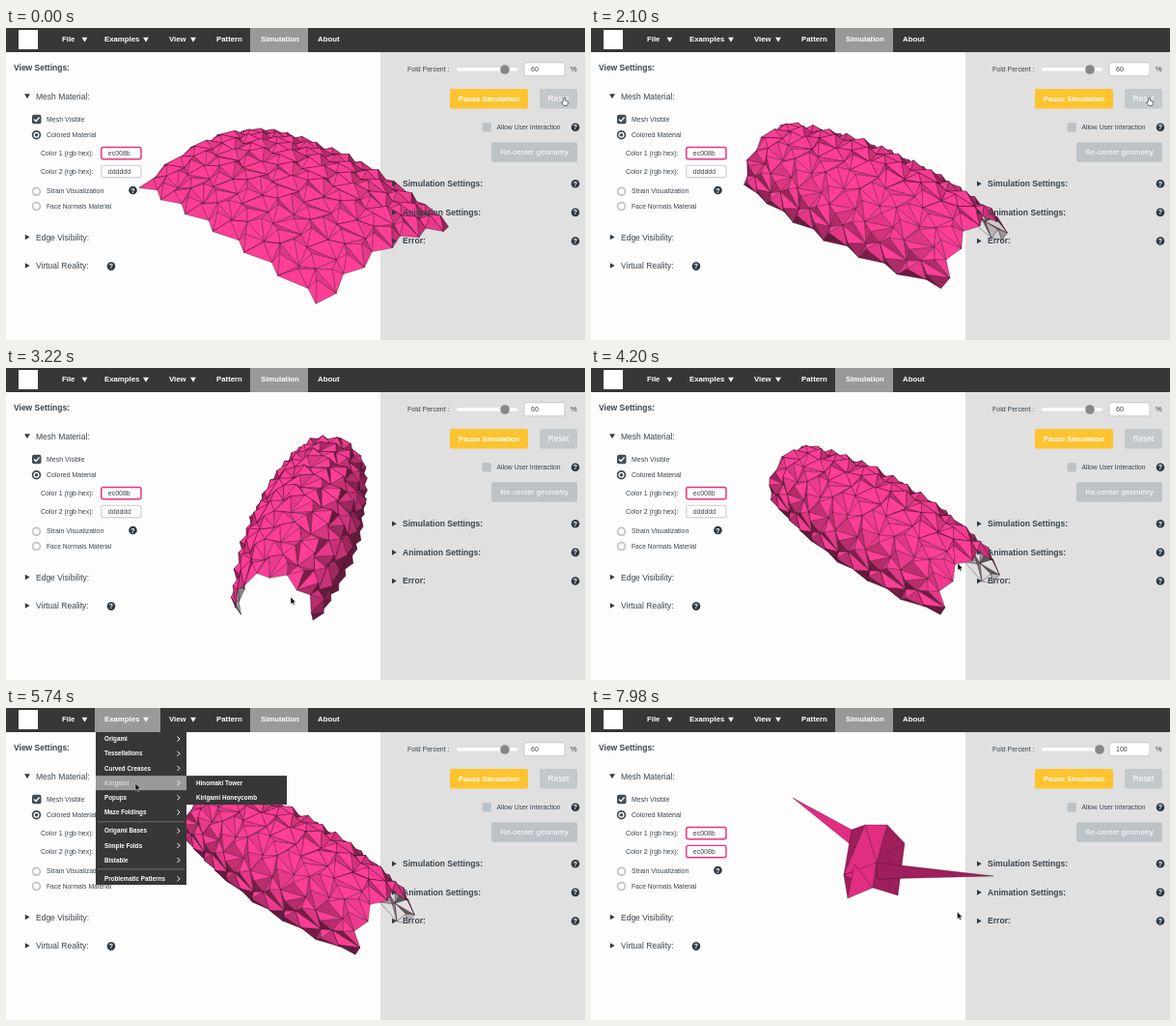
An HTML page with a canvas for the animation above (8 s loop, 600 px wide and 323 px high).

```html
<!DOCTYPE html>
<html>
<head>
<meta charset="utf-8">
<style>
  html, body { margin: 0; width: 600px; height: 323px; overflow: hidden; }
  body { background: linear-gradient(90deg, #fdfdfd 388px, #e0e0e0 388px); }
  canvas, svg { position: absolute; left: 0; top: 0; }
  text { font-family: "Liberation Sans", Arial, sans-serif; fill: #3a444d; white-space: pre; }
  .b { font-weight: bold; }
  .w { fill: #fff; }
</style>
</head>
<body>
<canvas id="stage" width="600" height="323"></canvas>
<svg id="ui" width="600" height="323"></svg>
<script>
const LOOP = 8000, STEP = 140, LOAD_TIME = 6300;
const ctx = document.getElementById('stage').getContext('2d');
const el = id => document.getElementById(id);
const clamp = (x, lo = 0, hi = 1) => Math.max(lo, Math.min(hi, x));
const smooth = x => x * x * (3 - 2 * x);
const mix = (a, b, f) => a.map((x, i) => x + (b[i] - x) * f);
const hash = (i, j) => {
  const x = Math.sin(i * 12.9898 + j * 78.233) * 43758.5453;
  return x - Math.floor(x);
};

// Follows moves of the form [start, end, ...values]; it rests between them.
const track = (moves, t) => moves.reduce(
  (now, [start, end, ...next]) => mix(now, next, smooth(clamp((t - start) / (end - start)))),
  moves[0].slice(2));

// ---------- interface ----------
const text = (x, y, s, size = 7, cls = '', extra = '') =>
  `<text x="${x}" y="${y}" font-size="${size}" class="${cls}" ${extra}>${s}</text>`;
const rect = (x, y, w, h, fill, r = 0, extra = '') =>
  `<rect x="${x}" y="${y}" width="${w}" height="${h}" rx="${r}" fill="${fill}" ${extra}/>`;
const path = (d, fill = '#2f3943', extra = '') => `<path d="${d}" fill="${fill}" ${extra}/>`;
const ring = (x, y, color) =>
  `<circle cx="${x}" cy="${y}" r="3.9" fill="#fff" stroke="${color}" stroke-width="1.7"/>`;
const help = (x, y) =>
  `<circle cx="${x}" cy="${y}" r="4.3" fill="#2f3943"/>` +
  text(x, y + 2.5, '?', 7, 'b w', 'text-anchor="middle"');
const right = (x, y) => path(`M${x} ${y - 2.8}l4.8 2.8-4.8 2.8z`);
const down = (x, y, fill) => path(`M${x - 2.9} ${y - 2.3}h5.8l-2.9 4.8z`, fill);
const field = (id, x, y, w, h, color, width, value) =>
  rect(x, y, w, h, '#fff', 2, `stroke="${color}" stroke-width="${width}" id="${id}Box"`) +
  text(x + 7, y + h / 2 + 2.6, value, 7, '', `id="${id}"`);
const button = (x, y, w, label, size, fill, cls = '') =>
  rect(x, y, w, 20.5, fill, 2) +
  text(x + w / 2, y + 13, label, size, 'w ' + cls, 'text-anchor="middle"');

const examples = ['Origami', 'Tessellations', 'Curved Creases', 'Kirigami', 'Popups', 'Maze Foldings',
  'Origami Bases', 'Simple Folds', 'Bistable', 'Problematic Patterns'];
const submenus = { 0: ['Crane', 'Flapping Bird'], 3: ['Hinomaki Tower', 'Kirigami Honeycomb'] };
const rowY = i => 32 + 15.2 * i + (i > 5) * 4 + (i > 8) * 4;

function menu(hover) {
  let s = rect(93, 25, 94, 158, '#373737');
  examples.forEach((name, i) => {
    const y = rowY(i);
    if (i === hover) s += rect(93, y - 7.5, 94, 15, '#999');
    s += text(102, y + 2.2, name, 6.3, 'b w', i === hover ? 'opacity=".6"' : '') +
      path(`M177.5 ${y - 2.5}l2.5 2.5-2.5 2.5`, 'none', 'stroke="#fff"');
  });
  s += rect(95, 117.5, 90, .7, '#888') + rect(95, 166.5, 90, .7, '#888');
  if (submenus[hover]) {
    const y = rowY(hover) - 7.5;
    s += rect(187, y, 104, 30, '#373737') +
      submenus[hover].map((name, i) => text(197, y + 10 + i * 15, name, 6.3, 'b w')).join('');
  }
  return s;
}

el('ui').innerHTML = [
  rect(0, 0, 600, 25, '#373737'),
  rect(253, 0, 60, 25, '#999'),
  rect(92, 0, 68, 25, '#999', 0, 'id="tab"'),
  rect(13, 2, 20, 20, '#fff'),
  ...[['File', 58], ['Examples', 102], ['View', 169], ['Pattern', 218], ['Simulation', 264], ['About', 323]]
    .map(([s, x]) => text(x, 14.2, s, 7.8, 'b w')),
  ...[81.5, 145, 194].map(x => down(x, 12, '#fff')),

  text(8, 44, 'View Settings:', 8.5, 'b'),
  down(22, 70.5), text(31, 73.5, 'Mesh Material:', 8.5),
  rect(27, 89.7, 9.5, 9.5, '#434c55', 2),
  path('M29 94.5l2 2 3.6-4', 'none', 'stroke="#fff" stroke-width="1.4"'),
  text(42, 97, 'Mesh Visible'),
  ring(31.5, 110.7, '#434c55'), '<circle cx="31.5" cy="110.7" r="1.8" fill="#434c55"/>',
  text(42, 112.8, 'Colored Material'),
  text(36, 131.7, 'Color 1 (rgb hex):'), field('c1', 98.8, 123.4, 41.2, 12.4, '#f0307f', 1.5, 'ec008b'),
  text(36, 150.7, 'Color 2 (rgb hex):'), field('c2', 98.8, 142.4, 41.2, 12.4, '#d4d6d8', 1.4, 'dddddd'),
  ring(31.5, 169.3, '#bfc3c6'), text(42, 171, 'Strain Visualization'), help(131.5, 168),
  ring(31.5, 184.6, '#bfc3c6'), text(42, 186.5, 'Face Normals Material', 6.7),
  right(19.8, 216.5), text(31, 219.8, 'Edge Visibility:', 8.5),
  right(19.8, 246), text(31, 249.4, 'Virtual Reality:', 8.5), help(109, 246.6),

  text(416, 45.3, 'Fold Percent :'),
  rect(467, 41.3, 63, 3.2, '#fff', 1.6), '<circle id="knob" cy="43" r="4.8" fill="#868686"/>',
  field('pct', 537, 35.8, 42, 14, '#c8c8c8', 1, '60'), text(585, 45.3, '%', 7.5),
  button(460, 63, 81, 'Pause Simulation', 7.6, '#fec32e', 'b'),
  button(553, 63, 39, 'Reset', 8.2, '#c3c8cb'),
  rect(493.5, 98, 9.5, 9.5, '#bdc2c6', 2), text(508.5, 105.3, 'Allow User Interaction', 6.8),
  help(590, 102.8),
  button(503, 118.3, 89, 'Re-center geometry', 8, '#bdc2c6'),
  ...['Simulation Settings:', 'Animation Settings:', 'Error:'].map((s, i) => {
    const y = 161.3 + i * 29.6;
    return right(400, y) + text(411, y + 2.9, s, 8.6, 'b') + help(590, y);
  }),
  '<g id="menu"></g>',
  path('M0 0v7.6l1.7-1.5 1.2 2.5 1.2-.5-1.1-2.5h2.4z', '#111', 'id="arrow" stroke="#fff" stroke-width=".4"'),
  path('M-1 0h1.3v3l3 .8v2.6l-1 2h-3.3l-2.4-3.2 1.4-.3z', '#fff', 'id="hand" stroke="#333" stroke-width=".7"')
].join('');

const cursorMoves = [
  [0, 1, 579, 72], [2240, 2520, 405, 215], [2520, 3220, 295, 237], [3360, 4200, 380, 202],
  [4620, 5000, 125, 14], [5000, 5740, 134, 78], [5740, 6300, 205, 35],
  [6300, 6720, 517, 42], [6720, 7200, 527, 42], [7200, 7980, 379.5, 211]
];

function updateUi(t, percent) {
  const [x, y] = track(cursorMoves, t), loaded = t >= LOAD_TIME, open = t >= 4900 && !loaded;
  const hover = x > 187 ? 0 : examples.findIndex((_, i) => Math.abs(rowY(i) - y) < 7.7);
  el('menu').innerHTML = open ? menu(hover) : '';
  el('tab').style.display = open ? '' : 'none';
  el('c2').textContent = loaded ? 'ec008b' : 'dddddd';
  el('c2Box').setAttribute('stroke', loaded ? '#f0307f' : '#d4d6d8');
  el('pct').textContent = percent;
  el('knob').setAttribute('cx', 502 + percent / 4);
  for (const id of ['arrow', 'hand']) {
    el(id).setAttribute('transform', `translate(${x} ${y})`);
    el(id).style.display = (id === 'hand') === (t < 2300) ? '' : 'none';
  }
}

// ---------- drawing ----------
function polygon(points, rgb, shade) {
  ctx.beginPath();
  points.forEach(p => ctx.lineTo(p[0], p[1]));
  ctx.closePath();
  ctx.fillStyle = `rgb(${rgb.map(c => Math.round(c * shade))})`;
  ctx.fill();
  ctx.stroke();
}

// ---------- tessellated sheet curling into a tube ----------
const PINK = [255, 62, 150], GRAY = [222, 222, 222];
const COLS = 12, ROWS = 10, HALF_LENGTH = 142, HALF_WIDTH = 104, TAPER = 16, DISTANCE = 1100;
const TILT = Math.PI / 6;

// Moves of the view: x and y of the crown, yaw in degrees, curl in radians.
const sheetMoves = [
  [0, 1, 297, 152, 48, .5], [0, 980, 294, 148, 48, 1], [980, 2100, 288, 136, 42, 1.6],
  [2380, 3220, 310, 122, 102, 1.95], [3360, 4200, 295, 122, 50, 1.95]
];

// Puts a point of the sheet (column, row, height above it) on the screen, with its depth.
function projector([cx, cy, degrees, curl]) {
  const yaw = degrees * Math.PI / 180, radius = HALF_WIDTH / curl;
  return (col, row, bump) => {
    const s = 2 * col / COLS - 1, angle = (2 * row / ROWS - 1) * curl;
    const r = radius - TAPER * s * s + bump;
    const along = s * HALF_LENGTH, across = r * Math.sin(angle), up = r * Math.cos(angle) - radius;
    const x = along * Math.cos(yaw) + across * Math.sin(yaw);
    const ground = along * Math.sin(yaw) - across * Math.cos(yaw);
    const y = ground * Math.sin(TILT) - up * Math.cos(TILT);
    const depth = ground * Math.cos(TILT) + up * Math.sin(TILT);
    const scale = DISTANCE / (DISTANCE - depth);
    return [cx + x * scale, cy + y * scale, depth];
  };
}

function facet(a, b, c) {
  const [px, py, pz] = b.map((q, i) => q - a[i]);
  const [qx, qy, qz] = c.map((q, i) => q - a[i]);
  const nx = py * qz - pz * qy, ny = pz * qx - px * qz, nz = px * qy - py * qx;
  const outside = nz > 0;
  const light = (-.25 * nx - .5 * ny + .8 * nz) / Math.hypot(nx, ny, nz) * (outside ? 1 : -1);
  return {
    points: [a, b, c], depth: a[2] + b[2] + c[2],
    rgb: outside ? PINK : GRAY, shade: clamp(.28 + .85 * light, .4, 1)
  };
}

function drawSheet(t) {
  const project = projector(track(sheetMoves, t));
  const corner = (i, j) =>
    project(i + ((i + j) & 1 ? .18 : -.18), j + (i & 1 ? .18 : -.18), 2 * hash(i, j) - 1);
  const facets = [];
  for (let i = 0; i < COLS; i++) for (let j = 0; j < ROWS; j++) {
    const peak = project(i + .3 + .2 * hash(i, j + 9), j + .5 + .2 * hash(i + 5, j), 4.5 + 2 * hash(j, i));
    const rim = [corner(i, j), corner(i, j + 1), corner(i + 1, j + 1), corner(i + 1, j)];
    rim.forEach((p, k) => facets.push(facet(peak, p, rim[(k + 1) % 4])));
  }
  facets.sort((a, b) => a.depth - b.depth).forEach(f => polygon(f.points, f.rgb, f.shade));
}

// ---------- crane ----------
const corners = {
  A: [209, 93], B: [270, 126], C: [276, 147], D: [284, 121], E: [296, 160], F: [262, 173],
  G: [266, 197], H: [273, 162], I: [307, 121], K: [325, 140], L: [318, 194], M: [292, 186],
  P: [417, 174], R: [297, 177]
};
const craneFaces = ['GFH', 'ABC', 'BDF', 'IDE', 'IEK', 'DEF', 'KEL', 'FEM', 'EML', 'HGM', 'PER'];

function drawCrane(t, fold) {
  const turn = clamp((t - 7980) / 9000, -.05, 0);
  // Unfolded, every corner lies on the rim of a flat diamond.
  const place = name => {
    const dx = corners[name][0] - 296, dy = corners[name][1] - 155;
    const spread = 95 / (Math.abs(dx) + 1.5 * Math.abs(dy));
    const r = spread + (1 - spread) * fold, angle = Math.atan2(dy, dx) + turn;
    const length = Math.hypot(dx, dy) * r;
    return [296 + length * Math.cos(angle), 155 + length * Math.sin(angle)];
  };
  craneFaces.forEach((names, i) =>
    polygon([...names].map(place), [232, 46, 134], i % 2 ? .97 : .68));
}

function frame(now) {
  const t = Math.floor(now % LOOP / STEP) * STEP;
  const percent = Math.round(60 + 40 * smooth(clamp((t - 6720) / 480)));
  ctx.clearRect(0, 0, 600, 323);
  ctx.lineWidth = .45;
  ctx.lineJoin = 'round';
  ctx.strokeStyle = 'rgba(50, 5, 30, .75)';
  if (t < LOAD_TIME) drawSheet(t);
  else drawCrane(t, Math.min(percent / 100, (t - LOAD_TIME) / 500));
  updateUi(t, percent);
}

const begin = performance.now();
(function tick() {
  frame(performance.now() - begin);
  requestAnimationFrame(tick);
})();
</script>
</body>
</html>
```
